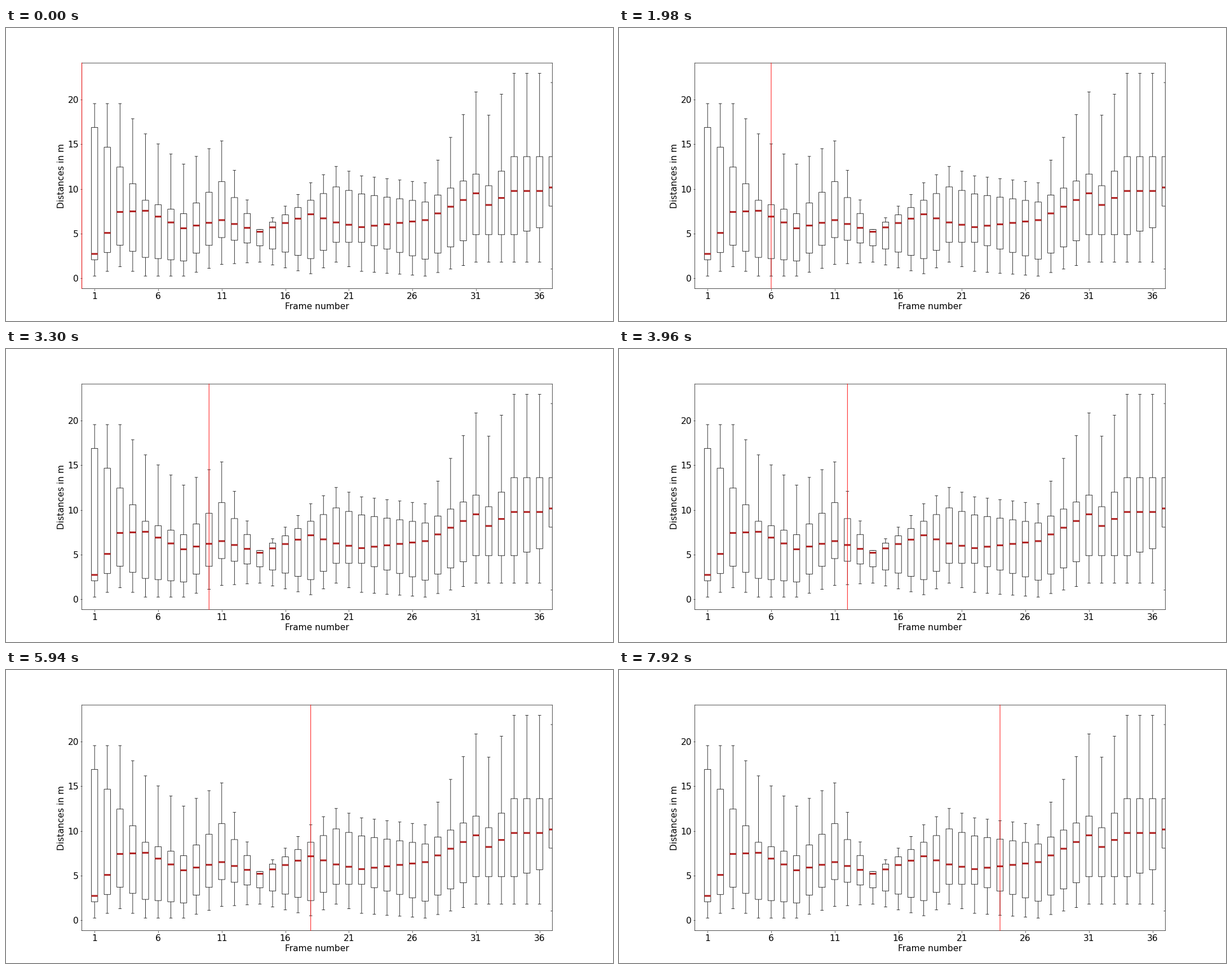
Recreate the animation shown at these times as a matplotlib script. Size 1077 by 520 pixels, loop 8000 ms.

```python
import numpy as np
import matplotlib.pyplot as plt
from matplotlib.animation import FuncAnimation
from matplotlib.collections import LineCollection

WIDTH, HEIGHT, DPI = 1077, 520, 56
LOOP_MS, INTERVAL, STEP_MS = 8000, 40, 330
UNIT = 0.26043  # distance resolution in metres

plt.rcParams.update({"font.family": "DejaVu Sans", "font.size": 20})

# Key boxes in UNITs: frame, low cap, lower edge, median, upper edge, high cap
KEYS = np.array([
    (1, 1, 8, 10.5, 64.75, 75),
    (3, 5, 14.25, 28.5, 47.75, 75),
    (5, 1, 9, 29, 33.5, 62),
    (8, 1, 7.5, 21.5, 27.75, 49),
    (11, 6, 17.5, 25, 41.5, 59),
    (14, 7, 14, 20, 21, 21),
    (18, 2, 8.5, 27.5, 33.5, 41),
    (20, 7, 15.5, 24, 39.25, 48),
    (22, 3, 15.5, 22, 36.25, 44),
    (27, 1, 8.25, 25, 32.75, 41),
    (31, 7, 18.75, 36.5, 44.75, 80),
    (32, 7, 18.75, 31.5, 39.75, 70),
    (34, 7, 18.75, 37.5, 52.25, 88),
    (36, 7, 21.75, 37.5, 52.25, 88),
    (37, 4, 31, 39, 52.25, 84),
])

x = np.arange(1, 38)
low, lower, median, upper, high = (
    UNIT * np.interp(x, KEYS[:, 0], column) for column in KEYS[:, 1:].T)

fig = plt.figure(figsize=(WIDTH / DPI, HEIGHT / DPI), dpi=DPI, facecolor="white")
ax = fig.add_axes([0.125, 0.1105, 0.775, 0.77])


def draw_boxes(half_box=0.25, half_cap=0.125):
    thin = dict(colors="black", linewidths=1, snap=False)
    for start, end in ((upper, high), (lower, low)):
        ax.vlines(x, start, end, **thin)
        ax.hlines(end, x - half_cap, x + half_cap, **thin)
    left, right = x - half_box, x + half_box
    boxes = [[(a, b), (c, b), (c, d), (a, d), (a, b)]
             for a, c, b, d in zip(left, right, lower, upper)]
    ax.add_collection(LineCollection(boxes, **thin))
    ax.hlines(median, left, right, colors="firebrick", linewidths=4,
              snap=False, zorder=3)


draw_boxes()
margin = 0.05 * high.max()
ax.set_xlim(0, 37)
ax.set_ylim(-margin, high.max() + margin)
ax.set_xticks(range(1, 37, 5))
ax.set_yticks(range(0, 21, 5))
ax.tick_params(axis="x", pad=4.8)
ax.set_xlabel("Frame number")
ax.set_ylabel("Distances in m")
for spine in ax.spines.values():
    spine.set(linewidth=0.9, snap=False)

cursor = ax.axvline(0, color="red", linewidth=1.2, snap=False,
                    clip_on=False, zorder=5)


def update(i):
    # The offset puts each jump on the tick nearest before its due time
    pos = (i * INTERVAL + 30) // STEP_MS
    cursor.set_xdata([pos, pos])
    return (cursor,)


anim = FuncAnimation(fig, update, frames=LOOP_MS // INTERVAL,
                     interval=INTERVAL, repeat=True, repeat_delay=0)
plt.show()
```
